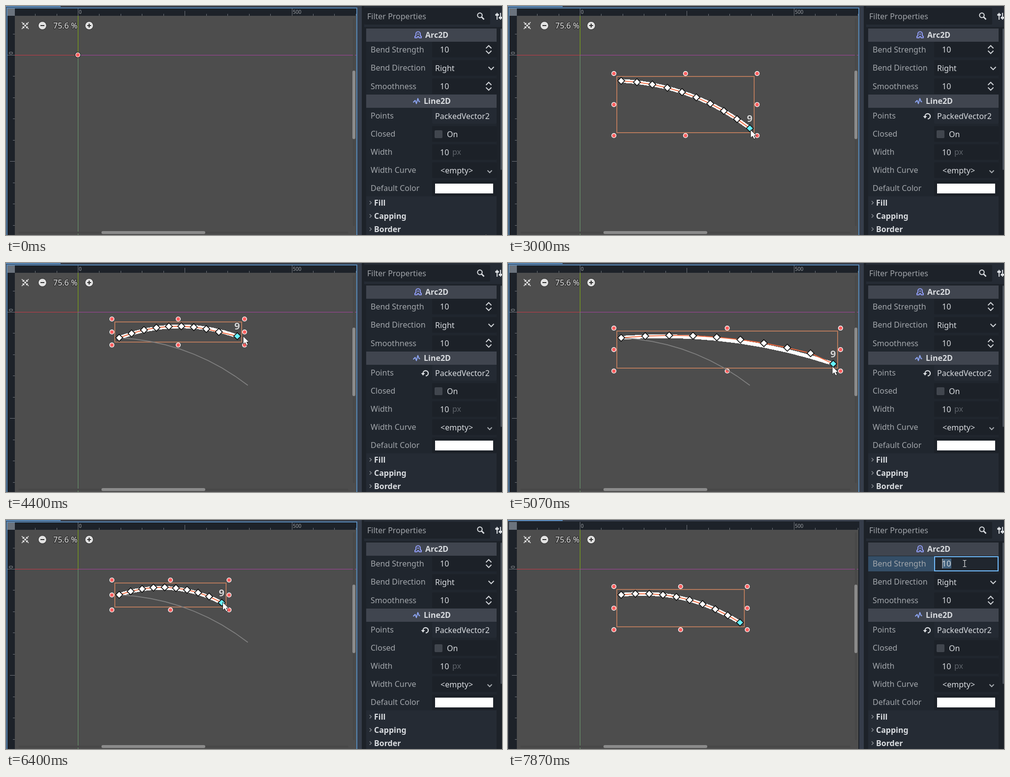
These frames come from a looping animation (1008 px wide and 468 px high, 8 s). An HTML page:

```html
<!DOCTYPE html>
<html lang="en">
<head>
<meta charset="utf-8">
<title>Arc2D editor</title>
<style>
html, body { margin: 0; width: 100%; height: 100%; overflow: hidden; background: #1d2229; }
svg { display: block; }
text { font: 16px "Noto Sans", sans-serif; white-space: pre; }
.label { fill: #a3a7ac; }
.value { fill: #d9dce0; }
.bold { fill: #d9dce0; font-weight: 700; }
.halo { paint-order: stroke; stroke: #333; stroke-width: 3px; stroke-linejoin: round; }
.tiny { font-size: 10px; fill: #9a9da1; }
</style>
</head>
<body>
<svg id="stage" width="1008" height="468" viewBox="0 0 1008 468">
  <rect width="1008" height="468" fill="#363d4a"/>
  <rect width="111" height="2" fill="#5a8fc4"/>
  <rect x="1" y="3" width="713" height="465" fill="#1d2229"/>
  <rect x="18" y="20" width="694" height="448" fill="#4d4d4d"/>
  <rect x="2" y="4" width="16" height="16" fill="#6b737d"/>
  <g id="ruler" fill="#70747a"></g>
  <text class="tiny" x="148" y="16">0</text>
  <text class="tiny" x="583" y="16">500</text>
  <text class="tiny" transform="translate(14 99) rotate(-90)">0</text>

  <path id="band" fill="none" stroke="#fff" stroke-width="7.6" shape-rendering="crispEdges"/>

  <g shape-rendering="crispEdges">
    <rect x="18" y="100" width="128" height="1" fill="#c23a48"/>
    <rect x="146" y="100" width="566" height="1" fill="#a1449a"/>
    <rect x="146" y="20" width="1" height="80" fill="#7fb010"/>
    <rect x="146" y="101" width="1" height="367" fill="#6c9c70"/>
  </g>

  <g fill="#484848">
    <rect x="705" y="25" width="4" height="425" rx="2"/>
    <rect x="25" y="461" width="671" height="4" rx="2"/>
  </g>
  <g fill="#8b8b8b">
    <rect x="704" y="132" width="6" height="140" rx="3"/>
    <rect x="194" y="460" width="211" height="6" rx="3"/>
  </g>

  <g fill="#e3e3e3">
    <circle cx="74" cy="40" r="8.7" fill="#333"/><circle cx="74" cy="40" r="7.8"/>
    <circle cx="169" cy="40" r="8.7" fill="#333"/><circle cx="169" cy="40" r="7.8"/>
    <path d="M70 40H78M165 40H173M169 36V44" stroke="#333" stroke-width="2.2"/>
    <circle cx="39" cy="40" r="2"/>
    <path d="M32 33L36.5 37.5M46 33L41.5 37.5M32 47L36.5 42.5M46 47L41.5 42.5M36.5 34.5V37.5H33.500M41.5 34.500V37.500H44.500M36.500 45.500V42.500H33.500M41.500 45.500V42.500H44.500" fill="none" stroke="#e3e3e3" stroke-width="1.5"/>
    <text class="halo" x="96" y="46">75.6 %</text>
  </g>

  <g id="overlay">
    <rect id="box" fill="none" stroke="#ca825f" stroke-width="1.6"/>
    <g id="grips"></g>
    <path id="ghost" fill="none" stroke="#808080" stroke-width="1.7"/>
    <path id="wire" fill="none" stroke="#f2683d" stroke-width="1.8"/>
    <g id="nodes"></g>
    <text id="index" class="halo" font-weight="600" fill="#d2d2d2" style="font-size:20px;stroke:#444;font-weight:600"></text>
  </g>
  <g id="pivot"><circle cx="146" cy="100" r="6" fill="#111"/><circle cx="146" cy="100" r="5" fill="#fff"/><circle cx="146" cy="100" r="3.8" fill="#ff5f5f"/></g>

  <rect id="focus" x="2" y="4" width="711" height="480" fill="none" stroke="#5d92c4" stroke-width="1.8"/>

  <rect x="723" width="5" height="468" fill="#1d2229"/>
  <rect x="728" width="280" height="468" fill="#252b34"/>
  <rect x="728" y="4" width="256" height="34" rx="2" fill="#1d2229"/>
  <rect x="728" y="43" width="280" height="425" fill="#1d2229"/>
  <rect x="732" y="73" width="265" height="316" fill="#20262e"/>
  <rect x="732" y="389" width="265" height="79" fill="#252b34"/>
  <rect x="1005" y="46" width="3" height="289" rx="1.500" fill="#4b515a"/>
  <text x="734" y="27" fill="#a0a4a9">Filter Properties</text>
  <g fill="none" stroke="#dcdfe3" stroke-width="2">
    <circle cx="963" cy="19" r="4.700"/><path d="M966.500 22.500L971.500 27.500" stroke-width="2.600"/>
    <path d="M998 14V28M1005 14V28"/>
    <path d="M994.500 18H1001.500M1001.500 24H1008" stroke-width="4"/>
  </g>

  <g fill="#40454f"><rect x="732" y="46" width="265" height="27"/><rect x="732" y="181" width="265" height="27"/></g>
  <path d="M831 65V62L833 61V57A4.500 4.500 0 0 1 842 57V61L844 62V65H840L837.500 62L835 65ZM835.500 57.500H839.500" fill="none" stroke="#8d99f0" stroke-width="2" stroke-linejoin="round"/>
  <path d="M827.500 197L831.500 193L834 199.500L837 189L839.500 195.500H841.500" fill="none" stroke="#8da5f3" stroke-width="2" stroke-linejoin="round"/>
  <text class="bold" x="852" y="64.500">Arc2D</text>
  <text class="bold" x="849" y="199.500">Line2D</text>
  <g id="rows"></g>
  <g id="spins" fill="none" stroke="#cfd2d6" stroke-width="2"></g>
  <rect x="871" y="254" width="16" height="16" rx="2" fill="#41464e"/>
  <rect x="872" y="363" width="118" height="20" fill="#fff"/>
  <text x="907" y="304" fill="#5e636a">px</text>
  <g fill="none" stroke="#cfd2d6" stroke-width="2">
    <path d="M980.500 124.500L986 130L991.500 124.500"/>
    <path d="M978.500 336L983 340.500L987.500 336" stroke="#a9adb2"/>
  </g>
  <g id="revert" fill="none" stroke="#dcdfe3" stroke-width="2.200">
    <path d="M847.500 225.500A5.300 5.300 0 1 1 853 230.700"/>
    <path d="M843.500 225H851.500L847.500 230Z" fill="#dcdfe3" stroke="none"/>
  </g>

  <g id="edit">
    <rect x="732" y="74" width="134" height="31" fill="#344e67"/>
    <text class="label" x="741" y="95">Bend Strength</text>
    <rect x="867" y="75" width="129" height="29" fill="#20262e" stroke="#70bafa" stroke-width="2"/>
    <rect x="883" y="79" width="18" height="20" fill="#41607c"/>
    <text class="value" x="882" y="95">10</text>
    <rect x="882.500" y="79" width="1" height="20" fill="#d9dce0"/>
  </g>
  <path id="arrow" d="M0 0V16.500L4 13L6.800 19L9.800 17.600L7.200 12H12Z" fill="#fff" stroke="#222" stroke-width="1"/>
  <path id="beam" d="M-3.500 -6.500H-1L0 -5.500L1 -6.500H3.500M0 -5.500V5.500M-3.500 6.500H-1L0 5.500L1 6.500H3.500" fill="none" stroke="#e4e4e4" stroke-width="1.200"/>
</svg>
<script>
const $ = id => document.getElementById(id);
const NS = "http://www.w3.org/2000/svg";
function add(parent, tag, attrs, text) {
  const el = document.createElementNS(NS, tag);
  for (const k in attrs) el.setAttribute(k, attrs[k]);
  if (text) el.textContent = text;
  parent.appendChild(el);
  return el;
}
const set = (id, attrs) => { for (const k in attrs) $(id).setAttribute(k, attrs[k]); };
const show = (id, on) => set(id, { visibility: on ? "visible" : "hidden" });

// Rulers: one tick per 50 units
for (let i = -2; i < 14; i++) {
  const x = Math.round(146 + i * 43.45), y = Math.round(100 + i * 43.45);
  const len = i % 10 === 0 ? 16 : i % 5 === 0 ? 10 : 4;
  if (x > 18 && x < 713) add($("ruler"), "rect", { x, y: 20 - len, width: 1, height: len });
  if (y > 20) add($("ruler"), "rect", { x: 18 - len, y, width: len, height: 1 });
}

// Inspector rows: name, centre, value, value x
[["Bend Strength", 89, "10", 882], ["Bend Direction", 126.5, "Right", 872],
 ["Smoothness", 164, "10", 882], ["Points", 224.500, "PackedVector2", 872],
 ["Closed", 261.500, "On", 896], ["Width", 298.500, "10", 882],
 ["Width Curve", 335.500, "<empty>", 883], ["Default Color", 372.500, "", 0]
].forEach(([name, y, value, x]) => {
  const rows = $("rows");
  add(rows, "rect", { x: 866, y: y - 16, width: 131, height: 32, rx: 2, fill: name === "Points" ? "#242a33" : "#1c2128" });
  add(rows, "text", { x: 741, y: y + 5.5, class: "label" }, name);
  add(rows, "text", { x, y: y + 6, class: "value" }, value);
});
[["Fill", 402], ["Capping", 429], ["Border", 456]].forEach(([name, y]) => {
  add($("rows"), "text", { x: 748, y: y + 5.8, class: "bold" }, name);
  add($("rows"), "path", { d: `M739 ${y - 3.5}L742.500 ${y}L739 ${y + 3.5}`, fill: "none", stroke: "#858a91", "stroke-width": 1.6 });
});
const spins = [89, 164].map(y => add($("spins"), "path", {
  d: `M975.500 ${y - 2.5}L981 ${y - 8}L986.500 ${y - 2.5}M975.500 ${y + 2.5}L981 ${y + 8}L986.500 ${y + 2.5}` }));

const grips = Array.from({ length: 8 }, () =>
  add($("grips"), "circle", { r: 4.3, fill: "#ff5f5f", stroke: "#fff", "stroke-width": 1.4 }));
const nodes = Array.from({ length: 10 }, () =>
  add($("nodes"), "path", { d: "M0 -7.200L7.200 0L0 7.200L-7.200 0Z", stroke: "#161616", "stroke-width": 1.7 }));

// Pointer path: step, x, y (15 steps a second)
const STEP = 1000 / 15, LOOP = 8000;
const keys = [
  [0, 975, 466], [3, 800, 375], [6, 480, 235], [9, 265, 162], [11, 231, 152], [16, 231, 152],
  [19, 285, 180], [22, 390, 228], [25, 480, 260], [27, 494, 262], [28, 492, 251], [32, 492, 251],
  [35, 494, 258], [37, 494, 258], [42, 493, 253], [46, 493, 253],
  [50, 470, 230], [54, 440, 208], [57, 418, 192], [60, 404, 172], [62, 420, 156],
  [64, 458, 149], [65, 470, 149.5], [66, 482, 149.5], [68, 545, 147], [70, 611, 148],
  [72, 648, 166], [74, 662, 198], [75, 661, 206], [76, 659, 211], [78, 630, 255],
  [80, 540, 293], [82, 430, 295], [84, 380, 274], [88, 335, 230], [91, 370, 185],
  [93, 425, 165.5], [94, 435, 166.5], [95, 438.5, 169], [96, 440.5, 168],
  [99, 455, 186], [102, 471.5, 209.5], [103, 471.5, 209.5],
  [106, 640, 142], [109, 866, 99], [111, 912, 91], [113, 928, 89], [120, 928, 89]];

function slope(i, c) {
  const a = keys[i - 1], b = keys[i], d = keys[i + 1];
  const same = k => !k || (k[1] === b[1] && k[2] === b[2]);
  return same(a) || same(d) ? 0 : (d[c] - a[c]) / (d[0] - a[0]);
}
function pointer(n) {
  let i = 0;
  while (i < keys.length - 2 && keys[i + 1][0] <= n) i++;
  const a = keys[i], b = keys[i + 1], h = b[0] - a[0], u = (n - a[0]) / h, v = 1 - u;
  return [1, 2].map(c =>
    a[c] * v * v * (1 + 2 * u) + b[c] * u * u * (3 - 2 * u) +
    h * u * v * (slope(i, c) * v - slope(i + 1, c) * u));
}

const START = [230, 152.8], FIRST_END = [491.5, 250], SAG = 21.7;
const CLICK1 = 12, CLICK2 = 29, DRAG = 46, DROP = 102, EDIT = 115;

function arc(end) {
  const dx = end[0] - START[0], dy = end[1] - START[1], len = Math.hypot(dx, dy);
  return Array.from({ length: 10 }, (_, i) => {
    const u = i / 9, s = 4 * SAG * u * (1 - u) / len;
    return [START[0] + dx * u + dy * s, START[1] + dy * u - dx * s];
  });
}
// The curve end trails the pointer by one step
function endAt(n) {
  const k = n - 1;
  return k <= DRAG ? FIRST_END : pointer(Math.min(k, DROP));
}
const line = pts => "M" + pts.map(p => p.map(v => v.toFixed(2)).join(" ")).join("L");
$("ghost").setAttribute("d", line(arc(FIRST_END)));

function draw(ms) {
  const n = Math.floor((ms + 5) / STEP) % 120;
  const [px, py] = pointer(n);
  const placed = n >= CLICK1, curved = n >= CLICK2, editing = n >= EDIT;

  let pts = [START];
  if (curved) {
    const end = endAt(n);
    pts = arc(endAt(n - 1));
    pts[9] = end;
    set("band", { d: line(arc(end)) });
    set("wire", { d: line(pts) });
  }
  show("band", curved);
  show("wire", curved);
  show("ghost", n > DRAG && n <= DROP + 1);
  show("pivot", !placed);
  set("overlay", { display: placed ? "inline" : "none" });

  const xs = pts.map(p => p[0]), ys = pts.map(p => p[1]), pad = 8.8;
  const x0 = Math.min(...xs) - pad, x1 = Math.max(...xs) + pad;
  const y0 = Math.min(...ys) - pad, y1 = Math.max(...ys) + pad;
  set("box", { x: x0, y: y0, width: x1 - x0, height: y1 - y0 });
  const gx = [x0 - 6, (x0 + x1) / 2, x1 + 6], gy = [y0 - 6, (y0 + y1) / 2, y1 + 6];
  grips.forEach((g, i) => {
    const k = i < 4 ? i : i + 1;
    g.setAttribute("cx", gx[k % 3]);
    g.setAttribute("cy", gy[Math.floor(k / 3)]);
  });

  const last = pts.length - 1, active = !curved || n > CLICK2;
  nodes.forEach((d, i) => {
    d.setAttribute("display", i <= last ? "inline" : "none");
    if (i > last) return;
    d.setAttribute("transform", `translate(${pts[i]})`);
    d.setAttribute("fill", i === last && active ? "#66f2ff" : "#fff");
  });
  const hover = n < 18 || (n >= 30 && n < 34) || (n >= 40 && n <= DROP + 1);
  set("index", { x: pts[last][0] - 6, y: pts[last][1] - 13.3 });
  $("index").textContent = hover ? String(last) : "";

  show("revert", placed);
  show("focus", !editing);
  show("edit", editing);
  spins[0].setAttribute("visibility", editing ? "hidden" : "visible");
  show("arrow", !editing);
  show("beam", editing);
  set(editing ? "beam" : "arrow", { transform: `translate(${px} ${py})` });
}

const began = performance.now();
function tick() {
  draw((performance.now() - began) % LOOP);
  requestAnimationFrame(tick);
}
draw(0);
requestAnimationFrame(tick);
</script>
</body>
</html>
```
